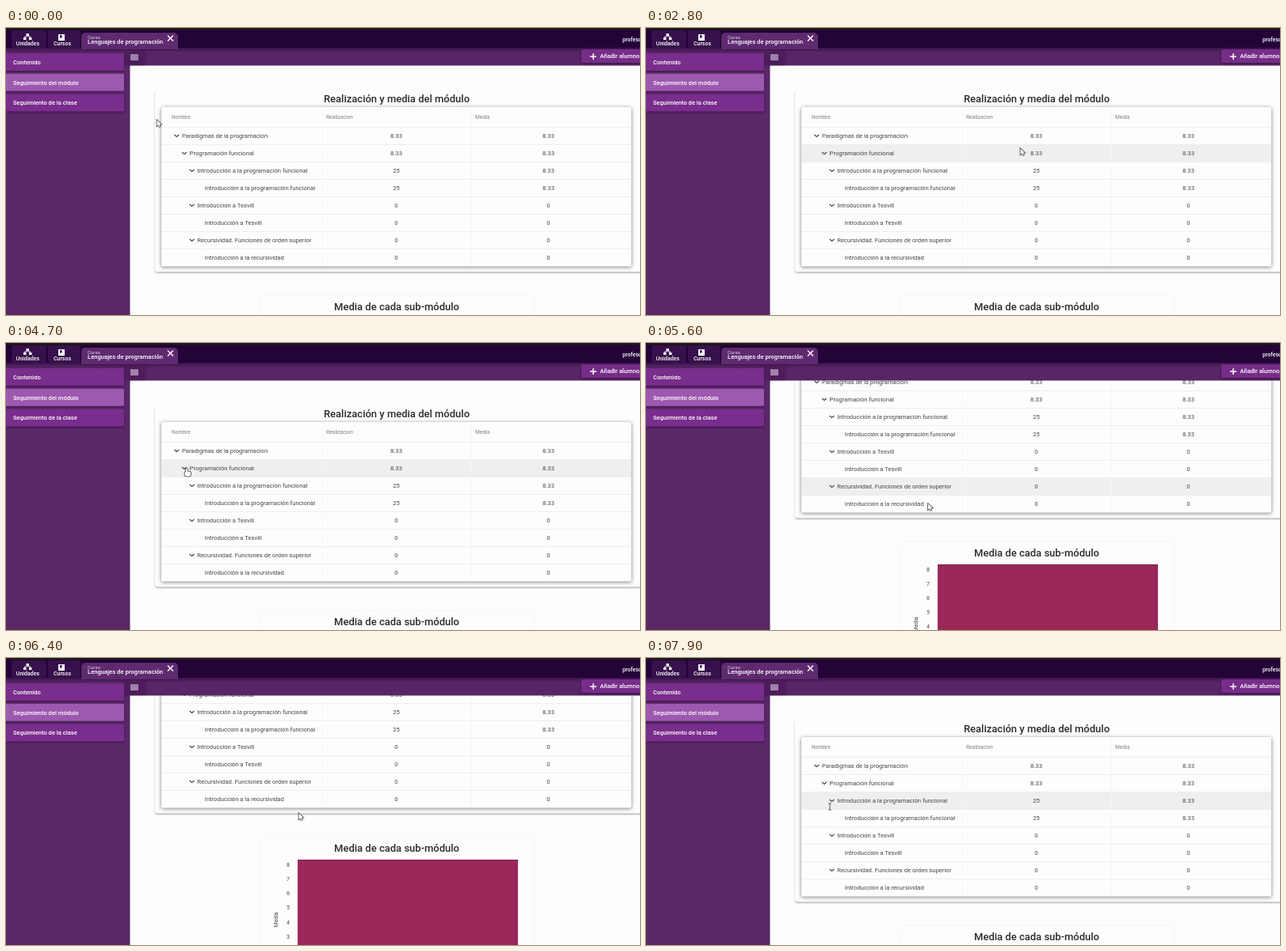
Write an HTML page with a canvas that moves like this. It is 800 px wide and 363 px high and loops after 8 s.

```html
<!DOCTYPE html>
<html lang="es">
<head>
<meta charset="utf-8">
<title>Seguimiento del módulo</title>
<style>
html, body { margin: 0; width: 100%; height: 100%; overflow: hidden; background: #fff; }
canvas { display: block; width: 800px; height: 363px; filter: blur(.35px); }
</style>
</head>
<body>
<canvas id="stage" width="800" height="363"></canvas>
<script>
const ctx = document.getElementById('stage').getContext('2d');
const LOOP = 8000, STEP = 100;
const ROW_TOP = 125, ROW_H = 22, LEAF = 3;

// depth, name, completion, average
const rows = [
  [0, 'Paradigmas de la programación', '8.33', '8.33'],
  [1, 'Programación funcional', '8.33', '8.33'],
  [2, 'Introducción a la programación funcional', '25', '8.33'],
  [3, 'Introducción a la programación funcional', '25', '8.33'],
  [2, 'Introducción a Tesvill', '0', '0'],
  [3, 'Introducción a Tesvill', '0', '0'],
  [2, 'Recursividad. Funciones de orden superior', '0', '0'],
  [3, 'Introducción a la recursividad', '0', '0']
];

// where the pointer rests: from, until, x, y
const stops = [
  [0, 1000, 190, 116], [1300, 1900, 193, 260], [2400, 2400, 430, 246],
  [2800, 2800, 472, 152], [3300, 4800, 228, 158], [5500, 5500, 355, 203],
  [6400, 6800, 369, 196], [7800, LOOP, 232, 188]
];

function ease(t, from, to) {
  const u = Math.min(1, Math.max(0, (t - from) / (to - from)));
  return u * u * (3 - 2 * u);
}

function scrollAt(t) {
  return 112 * (ease(t, 5200, 5776) - ease(t, 6800, 7300));
}

function pointerAt(t) {
  let [, left, x, y] = stops[0];
  for (const [from, until, nx, ny] of stops.slice(1)) {
    const k = ease(t, left, from);
    x += (nx - x) * k;
    y += (ny - y) * k;
    left = until;
  }
  return [x, y];
}

// Hover follows the scroll one step late.
function hoveredRow(t) {
  const [x, y] = pointerAt(t);
  return x > 195 ? Math.floor((y + scrollAt(t - STEP) - ROW_TOP) / ROW_H) : -1;
}

function text(str, x, y, size, color, weight = 400, align = 'left') {
  ctx.font = `${weight} ${size}px Roboto, "Open Sans", sans-serif`;
  ctx.fillStyle = color;
  ctx.textAlign = align;
  ctx.fillText(str, x, y);
}

function rect(x, y, w, h, color) {
  ctx.fillStyle = color;
  ctx.fillRect(x, y, w, h);
}

function panel(x, y, w, h, r, color, shade, blur = 3, dy = 1) {
  ctx.save();
  ctx.shadowColor = shade;
  ctx.shadowBlur = blur;
  ctx.shadowOffsetY = dy;
  ctx.fillStyle = color;
  ctx.beginPath();
  ctx.roundRect(x, y, w, h, r);
  ctx.fill();
  ctx.restore();
}

function line(points, color, width) {
  ctx.strokeStyle = color;
  ctx.lineWidth = width;
  ctx.beginPath();
  points.forEach(p => ctx.lineTo(...p));
  ctx.stroke();
}

function drawTable(hover) {
  panel(188, 79, 618, 229.5, 3, '#fefdfe', 'rgba(0,0,0,.34)', 2, 1.2);
  text('Realización y media del módulo', 493, 94.2, 13, '#2b2b2b', 500, 'center');
  panel(196, 100, 593, 201.5, 2, '#fefdfe', 'rgba(0,0,0,.5)', 5);
  text('Nombre', 209, 115, 6.65, '#808080');
  text('Realizacion', 404, 115, 6.65, '#808080');
  text('Media', 592, 115, 6.65, '#808080');
  rows.forEach(([depth, name, done, avg], i) => {
    const y = ROW_TOP + i * ROW_H, x = 222 + depth * 9.6;
    if (i === hover) rect(196, y, 593, ROW_H, '#efeef0');
    rect(196, y, 593, 1, '#ededef');
    if (depth < LEAF) line([[x - 9.5, y + 10], [x - 6.6, y + 12.4], [x - 3.7, y + 10]], '#444', 1.2);
    text(name, x, y + 13.7, 7.65, '#444');
    text(done, 492.5, y + 13.7, 7.65, '#444', 400, 'center');
    text(avg, 684.5, y + 13.7, 7.65, '#444', 400, 'center');
  });
  rect(399, 101, 1, 200, '#f5f4f6');
  rect(587, 101, 1, 200, '#f5f4f6');
}

function drawChart() {
  panel(320, 339, 346, 280, 3, '#fefdfe', 'rgba(0,0,0,.08)', 2, 0);
  text('Media de cada sub-módulo', 493, 356.7, 13, '#2b2b2b', 500, 'center');
  rect(368, 367, 278, 170, '#9c285a');
  rect(368, 367, 278, 0.8, '#6b2148');
  for (let n = 8; n > 1; n--) text(n, 356, 375.7 + (8 - n) * 18.2, 7, '#444', 400, 'center');
  ctx.save();
  ctx.translate(342.5, 443);
  ctx.rotate(-Math.PI / 2);
  text('Media', 0, 0, 7, '#444', 400, 'center');
  ctx.restore();
}

function drawHeader() {
  rect(0, 0, 800, 47.5, '#582566');
  const fade = ctx.createLinearGradient(0, 25, 0, 31);
  fade.addColorStop(0, 'rgba(25,0,40,.45)');
  fade.addColorStop(1, 'rgba(25,0,40,0)');
  rect(0, 25, 800, 6, fade);
  rect(0, 0, 800, 25, '#240339');
  rect(0, 0, 800, 2.5, '#1c1a1c');
  panel(7, 3, 44, 22, 2, '#37114b', 'rgba(0,0,0,.3)', 2, 0);
  panel(53, 3, 41, 22, 2, '#37114b', 'rgba(0,0,0,.3)', 2, 0);
  panel(95, 6, 122, 21, [5, 5, 0, 0], '#5f2a70', 'rgba(0,0,0,.4)', 3, 0);

  rect(25.5, 7, 3.5, 3, '#fff');
  rect(22, 12, 3.5, 3, '#fff');
  rect(29, 12, 3.5, 3, '#fff');
  line([[23.7, 12], [23.7, 10.8], [30.7, 10.8], [30.7, 12]], '#fff', 0.9);
  text('Unidades', 27.5, 22.3, 7, '#fff', 500, 'center');
  rect(66, 8, 8, 8, '#fff');
  rect(68, 9, 2.5, 3.5, '#37114b');
  text('Cursos', 71, 22.3, 7, '#fff', 500, 'center');
  text('Curso', 103, 14, 6.1, '#e4d8e8');
  text('Lenguajes de programación', 103, 20.2, 7.65, '#fff', 500);
  line([[204, 9.5], [211, 16.5]], '#fff', 1.5);
  line([[211, 9.5], [204, 16.5]], '#fff', 1.5);
  text('profesor', 778, 16.5, 7, '#fff', 500);
}

function drawTools() {
  panel(150, 28, 26, 18, 3, '#4c1c5b', 'rgba(0,0,0,.3)');
  for (let i = 0; i < 4; i++) rect(157, 33.5 + i * 2, 10, 1.2, '#d6c6dc');
  panel(726, 27, 80, 17, 2, '#762d89', 'rgba(0,0,0,.45)');
  rect(737, 35.3, 8, 1.5, '#fff');
  rect(740.3, 32, 1.5, 8, '#fff');
  text('Añadir alumno', 749.5, 38.3, 7.65, '#fff', 500);
}

function drawSidebar() {
  rect(0, 31, 156.5, 332, '#5a2767');
  ['Contenido', 'Seguimiento del módulo', 'Seguimiento de la clase'].forEach((label, i) => {
    const y = 32 + i * 25.8;
    panel(-4, y, 153, 22, 2, i === 1 ? '#9d58b0' : '#792d8c', 'rgba(30,0,40,.5)');
    text(label, 9, y + 13.8, 7.6, '#fff', 500);
  });
}

function outlined() {
  ctx.strokeStyle = '#444';
  ctx.lineWidth = 1.6;
  ctx.stroke();
  ctx.fillStyle = '#fff';
  ctx.fill();
}

function drawArrow() {
  ctx.beginPath();
  [[0.5, 0.5], [0.5, 8], [2.3, 6.5], [3.6, 9], [4.9, 8.4], [3.7, 6], [6, 5.7]].forEach(p => ctx.lineTo(...p));
  ctx.closePath();
  outlined();
}

function drawHand() {
  ctx.beginPath();
  ctx.roundRect(-1, 0.5, 2, 7, 1);
  ctx.roundRect(-2.5, 4.5, 7.5, 6, 2);
  outlined();
}

function drawCaret() {
  line([[-2, -4], [2, -4]], '#555', 0.9);
  line([[0, -4], [0, 4]], '#555', 1);
  line([[-2, 4], [2, 4]], '#555', 0.9);
}

function drawPointer(t) {
  ctx.save();
  ctx.translate(...pointerAt(t));
  if (t >= 3300 && t < 4900) drawHand();
  else if (t >= 7700) drawCaret();
  else drawArrow();
  ctx.restore();
}

function draw(t) {
  rect(0, 0, 800, 363, '#fefdfe');
  ctx.save();
  ctx.translate(0, -scrollAt(t));
  drawTable(hoveredRow(t));
  drawChart();
  ctx.restore();
  drawHeader();
  drawSidebar();
  drawTools();
  drawPointer(t);
}

function tick() {
  const t = performance.now() % LOOP;
  draw(Math.floor(t / STEP) * STEP);
  requestAnimationFrame(tick);
}
tick();
</script>
</body>
</html>
```
